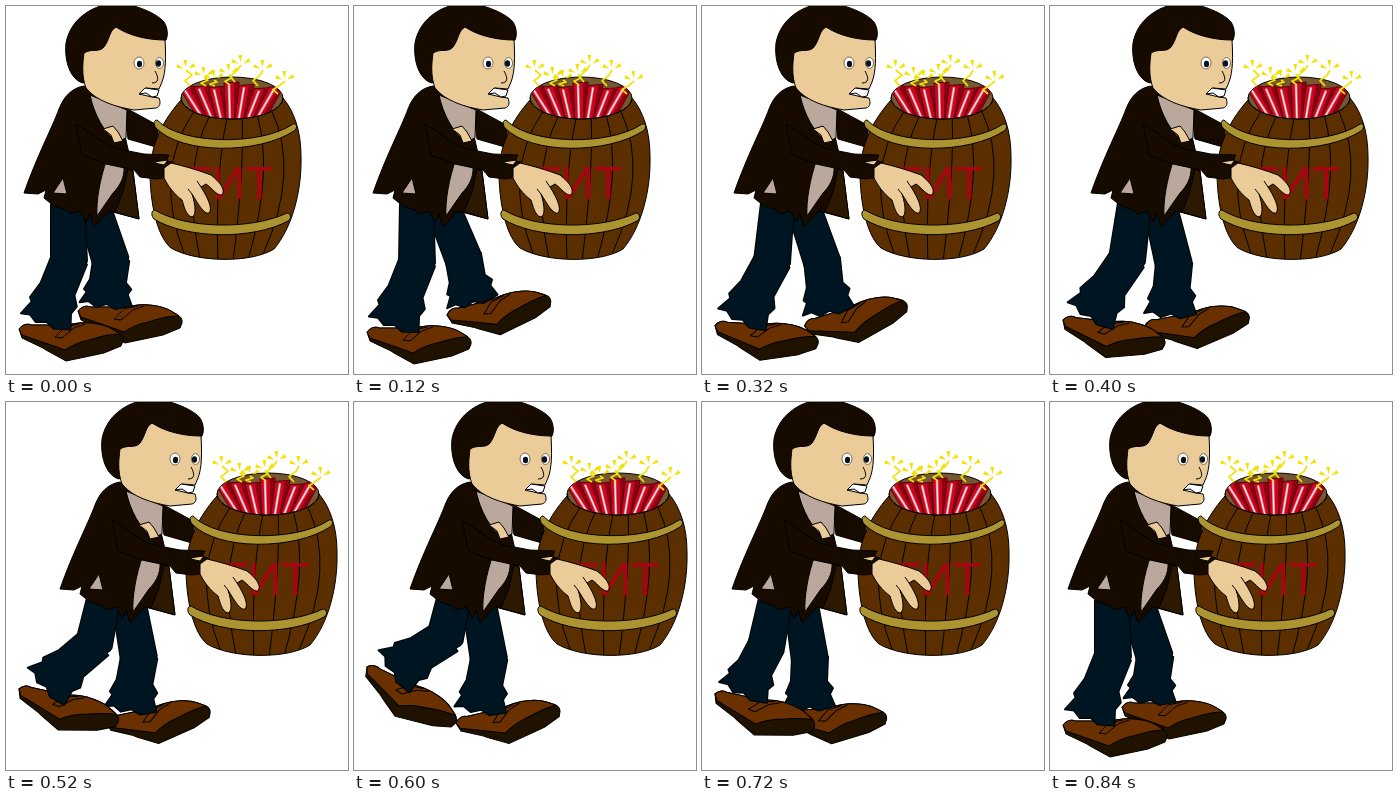
Animation of 342x368 px, one loop 880 ms. Source, as an HTML page with a canvas:

```html
<!DOCTYPE html>
<html lang="ru">
<head>
<meta charset="utf-8">
<title>Barrel walk</title>
<style>
html, body { margin: 0; width: 100%; height: 100%; overflow: hidden; background: #fff; }
canvas { display: block; }
</style>
</head>
<body>
<canvas id="stage" width="342" height="368"></canvas>
<script>
const ctx = document.getElementById('stage').getContext('2d');
const LOOP = 880, STEP = 40;
const SKIN = '#ebcb97', COAT = '#170b00', LINING = '#2d1802', SHIRT = '#bba89d', DENIM = '#001522';
const WOOD = '#5c2f00', HOOP = '#ac9430', RED = '#a80412', YELLOW = '#f2e205';

// time, body x, then for the near and far leg: heel x, heel y, shoe angle, knee x, knee y
const POSES = [
  [0, 0, 13, 323, 0, 63, 255, 72, 305, 0, 105, 256],
  [120, 1, 13, 326, 0, 63, 257, 93, 309, -14, 110, 254],
  [240, 5, 13, 325, 0, 63, 258, 110, 320, -24, 117, 255],
  [400, 23, 13, 314, 7, 77, 254, 95, 320, -11, 124, 259],
  [520, 36, 13, 287, 12, 88, 242, 100, 320, -12, 133, 257],
  [560, 40, 13, 277, 18, 90, 239, 103, 321, -12, 136, 257],
  [600, 38, 13, 265, 26, 91, 236, 102, 321, -13, 135, 258],
  [720, 12, 13, 292, 12, 64, 245, 80, 314, -5, 108, 258],
  [760, 5, 13, 304, 7, 64, 249, 77, 310, -3, 107, 258],
  [840, 0, 13, 323, 0, 63, 255, 72, 305, 0, 105, 256]
];

function poseAt(time) {
  const next = POSES.findIndex(p => p[0] > time);
  if (next < 0) return POSES[0];
  const a = POSES[next - 1], b = POSES[next];
  const k = (time - a[0]) / (b[0] - a[0]);
  return a.map((v, i) => v + (b[i] - v) * k);
}

function shape(d, fill, line = '#000', width = 1) {
  const path = new Path2D(d);
  if (fill) { ctx.fillStyle = fill; ctx.fill(path); }
  if (line) { ctx.strokeStyle = line; ctx.lineWidth = width; ctx.stroke(path); }
}

function oval(x, y, rx, ry, fill, line) {
  ctx.beginPath();
  ctx.ellipse(x, y, rx, ry, 0, 0, Math.PI * 2);
  ctx.fillStyle = fill;
  ctx.fill();
  if (line) { ctx.strokeStyle = line; ctx.lineWidth = 1; ctx.stroke(); }
}

function shoe(x, y, angle) {
  ctx.save();
  ctx.translate(x, y);
  ctx.rotate(angle);
  shape('M0,0C3,-4 8,-6 12,-4L45,-4L60,-6C70,-7 85,-5 93,0C100,4 105,6 104,12L102,17L85,24L47,32L27,21L24,19L3,9Z', '#1f1200');
  shape('M0,0C3,-4 8,-6 12,-4L45,-4L60,-6C70,-7 85,-5 93,0L101,5C90,5 80,8 70,11C60,13 52,17 46,21L32,16L3,6Z', '#6b3000');
  shape('M60,-5L46,-2L36,8L43,9L55,-1L66,-5', null);
  ctx.restore();
}

// A limb segment outlined in its own axes, y running from a to b.
function segment(ax, ay, bx, by, outline) {
  const placed = new Path2D();
  const turn = Math.atan2(by - ay, bx - ax) * 180 / Math.PI - 90;
  const length = Math.hypot(bx - ax, by - ay);
  placed.addPath(new Path2D(outline(length)), new DOMMatrix().translate(ax, ay).rotate(turn));
  return placed;
}

function leg(hipX, [heelX, heelY, degrees, kneeX, kneeY]) {
  const angle = degrees * Math.PI / 180, c = Math.cos(angle), s = Math.sin(angle);
  const ankleX = heelX + 29 * c + 11 * s, ankleY = heelY + 29 * s - 11 * c;
  shoe(heelX, heelY, angle);
  const parts = [
    segment(hipX, 198, kneeX, kneeY, n => `M-17,0L-18,${n}C-16,${n + 12} 14,${n + 14} 18,${n}L16,0Z`),
    segment(kneeX, kneeY, ankleX, ankleY, n =>
      `M-18,-3L-19,${n * .5}L-24,${n * .78}L-21,${n * .84}L-27,${n + 5}l9,-2l8,5l10,-4l9,4L25,${n + 3}L20,${n * .8}L23,${n * .66}L17,${n * .5}L18,-3Z`)
  ];
  ctx.strokeStyle = '#000';
  ctx.lineWidth = 2;
  ctx.fillStyle = DENIM;
  parts.forEach(p => ctx.stroke(p));
  parts.forEach(p => ctx.fill(p));
}

function coat() {
  shape('M118,101L153,120L150,141L122,133Z', COAT);
  shape('M78,80C66,82 58,90 53,103C46,122 31,150 18,187L32,188L40,184L38,192L48,200L60,204L64,208L74,205L80,216L84,208L88,221L103,205L133,213L127,165L119,130L122,103Z', COAT);
  shape('M122,163L127,165L133,213L109,206L117,186Z', LINING);
  shape('M84,89L121,104L120,132L111,136C98,127 88,108 84,89Z', SHIRT);
  shape('M97,123L107,120L112,126L117,135L108,137L105,129Z', SKIN);
  shape('M101,153L118,160C119,172 113,181 107,187L91,210C90,195 94,172 101,153Z', SHIRT);
  shape('M47,187L57,172L61,188Z', SHIRT);
}

function head() {
  shape('M77,77C65,74 58,56 60,37C64,15 83,0 108,-3C122,-4 150,6 158,16C162,22 162,30 160,34L120,55Z', COAT);
  shape('M78,47C86,42 93,47 98,41C104,33 103,25 110,21C122,29 140,34 159,34C160,50 160,66 156,76L153,83L140,82L133,88L146,91L153,92C155,97 154,101 150,102L128,104C110,101 90,95 80,82C75,69 77,55 78,47Z', SKIN);
  shape('M133,88L139,82L153,84L151,90L146,91L140,87Z', '#fff');
  oval(133, 57, 5, 6, '#fff', '#806c4c');
  oval(153.5, 57, 4, 5.5, '#fff', '#806c4c');
  oval(133.5, 58, 2.6, 3.2, '#071020');
  oval(152.5, 57.5, 2.6, 3.2, '#071020');
  shape('M149,65C153,72 153,77 146,77', null);
}

function dynamite() {
  oval(226, 92, 51, 21, '#76582e', '#000');
  ctx.save();
  ctx.beginPath();
  ctx.ellipse(226, 92, 50.5, 20.5, 0, 0, Math.PI * 2);
  ctx.clip();
  for (let i = 0; i < 7; i++) {
    const k = i / 3 - 1, top = 226 + 45 * k, foot = 226 + 25 * k;
    const y = 77 + (i % 3) * 2 + 4 * k * k;
    shape(`M${top - 8},${y}L${top + 7},${y - 1}L${foot + 6},118L${foot - 6},118Z`, '#cb0620', '#500008');
    shape(`M${top + 4},${y}L${foot + 4},118`, null, '#8c0012', 4);
    shape(`M${top - 3},${y + 2}L${foot - 2},116`, null, '#e5828a', 2.6);
    shape(`M${top - 3},${y + 2}L${foot - 2},116`, null, '#fff', 1);
  }
  ctx.restore();
  shape('M175,92A51,21 0 0 0 277,92', null);
}

function fuse(x, y, tipX, tipY) {
  const h = (y - tipY) / 3;
  shape(`M${x},${y}l-5,${-h}l7,${-h}L${tipX},${tipY}`, null, YELLOW, 1.7);
  for (const a of [-2.7, -1.65, -.55]) {
    const dx = Math.cos(a), dy = Math.sin(a);
    const px = tipX + dx * 3, py = tipY + dy * 3;
    shape(`M${px},${py}l${dx * 7 - dy * 2},${dy * 7 + dx * 2}l${dy * 4},${-dx * 4}Z`, YELLOW, null);
  }
}

function barrel() {
  shape('M175,94C152,120 144,145 144,170C145,205 153,232 165,242C191,257 246,257 268,243C286,222 296,185 295,150C295,125 288,105 277,92Z', WOOD);
  for (const k of [-.75, -.45, -.1, .2, .5, .78]) {
    const y = 92 + 21 * Math.sqrt(1 - k * k);
    shape(`M${226 + 51 * k},${y}Q${219 + 96 * k},165 ${217 + 52 * k},${253 - 10 * k * k}`, null);
  }
  shape('M151,114C175,139 255,140 287,118C291,117 292,122 288,125C253,148 176,149 150,122C147,118 148,114 151,114Z', HOOP);
  shape('M149,204C180,223 245,224 281,207C285,207 286,213 282,215C247,234 180,233 148,213C145,210 145,204 149,204Z', HOOP);
  dynamite();
  fuse(184, 80, 180, 64);
  fuse(200, 80, 198, 71);
  fuse(209, 80, 208, 74);
  fuse(224, 79, 223, 68);
  fuse(229, 76, 235, 59);
  fuse(252, 80, 257, 64);
  fuse(272, 88, 279, 75);
  ctx.fillStyle = RED;
  ctx.font = '46px "Liberation Sans", Arial, sans-serif';
  ctx.fillText('ТИТ', 178, 192.5);
}

function arm() {
  shape('M70,118C85,126 95,138 112,143L138,148L163,149L160,155L166,156L157,163L163,171L150,173L134,171L128,164L100,158L76,149Z', COAT);
  shape('M147,156L162,154L158,159L153,158Z', SKIN);
  shape('M158,162L165,157C178,160 192,164 205,169C214,176 220,184 216,189C211,190 206,182 200,178L195,181C202,192 207,203 203,207C198,209 191,196 186,188C190,200 190,210 186,211C180,210 178,200 176,194C168,188 162,180 158,172Z', SKIN);
  shape('M195,181L191,175M186,188L182,183', null);
}

function draw(now) {
  const time = Math.floor((now % LOOP) / STEP) * STEP;
  const pose = poseAt(time), shift = pose[1];
  ctx.fillStyle = '#fff';
  ctx.fillRect(0, 0, 342, 368);
  ctx.lineJoin = 'round';
  leg(87 + shift, pose.slice(7));
  leg(62 + shift, pose.slice(2, 7));
  ctx.save();
  ctx.translate(shift, 0);
  [coat, head, barrel, arm].forEach(part => part());
  ctx.restore();
}

let start;
function tick(now) {
  start ??= now;
  draw(now - start);
  requestAnimationFrame(tick);
}
requestAnimationFrame(tick);
</script>
</body>
</html>
```
